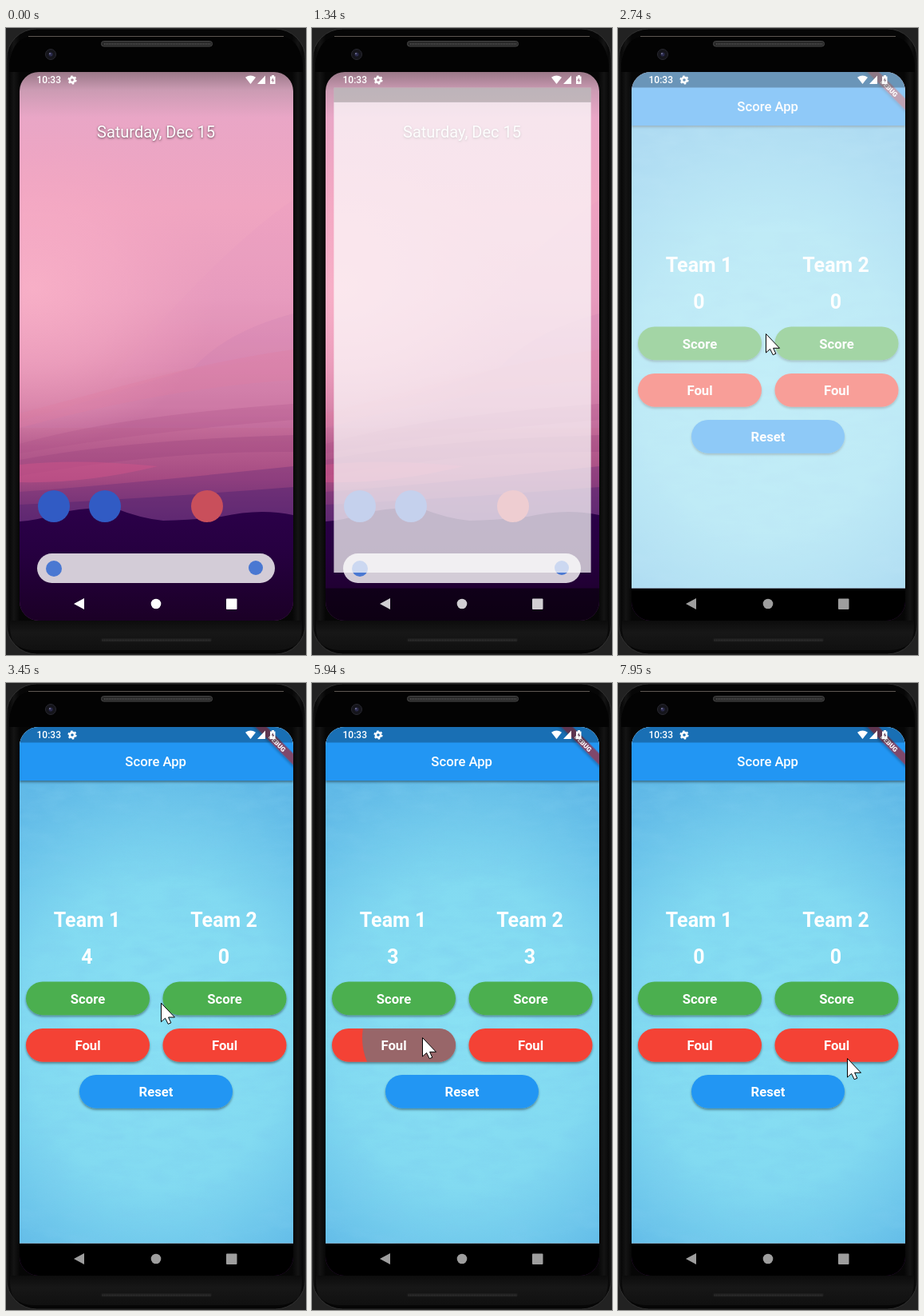
An HTML page that plays this animation: 376x784 px, repeating every 8 s.

```html
<!DOCTYPE html>
<html lang="en">
<head>
<meta charset="utf-8">
<title>Score App</title>
<style>
  html, body { margin: 0; width: 100%; height: 100%; overflow: hidden; background: #222; }
  svg { display: block; font-family: Roboto, sans-serif; }
  text { fill: #fff; }
  .mid { text-anchor: middle; }
  .big { font-size: 25px; font-weight: 700; }
  .label { font-size: 16.7px; font-weight: 700; }
</style>
</head>
<body>
<svg width="376" height="784" viewBox="0 0 376 784">
  <defs>
    <linearGradient id="body">
      <stop offset="0" stop-color="#1c1c1c"/><stop offset=".01" stop-color="#080808"/>
      <stop offset=".025" stop-color="#141414"/><stop offset=".045" stop-color="#060606"/>
      <stop offset=".955" stop-color="#060606"/><stop offset=".975" stop-color="#141414"/>
      <stop offset=".99" stop-color="#080808"/><stop offset="1" stop-color="#1c1c1c"/>
    </linearGradient>
    <linearGradient id="chin" x2="0" y2="1">
      <stop offset="0" stop-color="#0c0c0c"/><stop offset=".4" stop-color="#171717"/><stop offset="1" stop-color="#101010"/>
    </linearGradient>
    <linearGradient id="sky" gradientUnits="userSpaceOnUse" x1="0" y1="55" x2="0" y2="620">
      <stop offset="0" stop-color="#9a7888"/><stop offset=".04" stop-color="#cb9bb3"/>
      <stop offset=".1" stop-color="#e9a6c6"/><stop offset=".3" stop-color="#f0a5c1"/>
      <stop offset=".5" stop-color="#e89dbe"/><stop offset=".64" stop-color="#dd8bb0"/>
      <stop offset=".74" stop-color="#d07aa3"/><stop offset=".82" stop-color="#b96090"/>
      <stop offset=".9" stop-color="#a54a82"/><stop offset="1" stop-color="#662d70"/>
    </linearGradient>
    <linearGradient id="hill" x2="0" y2="1">
      <stop offset="0" stop-color="#2b0049"/><stop offset=".4" stop-color="#260040"/><stop offset="1" stop-color="#1b0026"/>
    </linearGradient>
    <radialGradient id="glow">
      <stop offset="0" stop-color="#fab2c8" stop-opacity=".85"/><stop offset=".5" stop-color="#f8adc6" stop-opacity=".5"/>
      <stop offset="1" stop-color="#f4a4c0" stop-opacity="0"/>
    </radialGradient>
    <radialGradient id="paper" gradientUnits="userSpaceOnUse" cx="0" cy="0" r="1" gradientTransform="translate(190 440) scale(300 345)">
      <stop offset="0" stop-color="#8ae1f4"/><stop offset=".55" stop-color="#82daf1"/><stop offset="1" stop-color="#60b9e7"/>
    </radialGradient>
    <filter id="grain" x="0" y="0" width="1" height="1">
      <feTurbulence type="fractalNoise" baseFrequency=".025 .07" numOctaves="5" seed="4"/>
      <feColorMatrix values="0 0 0 0 .2  0 0 0 0 .6  0 0 0 0 .86  1.3 0 0 0 -.48"/>
    </filter>
    <filter id="shadow" x="-.1" y="-.2" width="1.2" height="1.6">
      <feDropShadow dx="0" dy="2" stdDeviation="1.7" flood-opacity=".4"/>
    </filter>
    <clipPath id="screen"><rect x="17" y="55" width="343" height="686" rx="24"/></clipPath>
  </defs>

  <!-- phone -->
  <rect x=".5" y="1" width="375" height="782" rx="38" fill="url(#body)" stroke="#303030"/>
  <path d="M5 741H371V748Q371 778 340 778H36Q5 778 5 748Z" fill="url(#chin)"/>
  <path d="M4 46Q8 10.5 34 10.5H342Q368 10.5 372 46V55H4Z" fill="#030303"/>
  <path d="M28 10.5H348" stroke="#5d5752"/>
  <rect x="119.5" y="16.5" width="139" height="6.5" rx="3" fill="#292929" stroke="#444"/>
  <path d="M123 20H256" stroke="#4d4d4d" stroke-width="2" stroke-dasharray="1 1"/>
  <circle cx="56" cy="33" r="6.5" fill="#15151b" stroke="#282830"/>
  <circle cx="56" cy="33" r="2.5" fill="#2b2b4c"/><circle cx="55" cy="32" r="1" fill="#777796"/>
  <rect x="119" y="763" width="139" height="4.5" rx="2" fill="#1d1d1d"/>
  <path d="M121 765.5H257" stroke="#343434" stroke-width="2" stroke-dasharray="1 1"/>

  <g clip-path="url(#screen)">
    <g id="home">
      <rect x="17" y="55" width="343" height="686" fill="url(#sky)"/>
      <path d="M360 215Q270 275 130 440L360 410Z" fill="#d88fbd" opacity=".12"/>
      <path d="M17 492Q150 452 235 425Q275 380 360 357V500H17Z" fill="#c07ab0" opacity=".2"/>
      <ellipse cx="35" cy="325" rx="230" ry="200" fill="url(#glow)"/>
      <path d="M17 482Q150 446 222 428Q300 410 360 402V440Q200 450 17 500Z" fill="#de7a9f" opacity=".3"/>
      <path d="M17 520Q140 485 360 470V490Q170 505 17 532Z" fill="#a94c85" opacity=".25"/>
      <path d="M17 540Q150 515 360 509V530Q200 528 17 560Z" fill="#953f7b" opacity=".3"/>
      <path d="M17 546Q90 538 190 548Q100 570 17 568Z" fill="#cf5489" opacity=".5"/>
      <path d="M17 580Q150 570 360 548V620H17Z" fill="#6d2d78" opacity=".4"/>
      <path d="M17 596Q180 588 360 574V620H17Z" fill="#512370" opacity=".45"/>
      <path d="M17 617Q38 616 65 607Q100 598 138 601Q168 613 197 616Q238 615 270 611Q318 600 360 609V741H17Z" fill="url(#hill)"/>
      <text class="mid" x="188" y="137" font-size="20" style="text-shadow:0 1px 3px #0009">Saturday, Dec 15</text>
      <circle cx="60" cy="598" r="20" fill="#315bc4"/>
      <circle cx="124" cy="598" r="20" fill="#315bc4"/>
      <circle cx="252" cy="598" r="20" fill="#c94f5b"/>
      <rect x="39" y="657" width="298" height="37" rx="18.5" fill="#d3ccd7"/>
      <circle cx="60" cy="676" r="10" fill="#4a78d2"/>
      <circle cx="313" cy="675" r="9" fill="#4a78d2"/>
    </g>

    <rect id="navBar" x="17" y="700.5" width="343" height="40.5"/>
    <g id="window">
      <rect id="blank" x="17" y="55" width="343" height="645.5" fill="#fdfdfd"/>
      <g id="app">
        <rect x="17" y="55" width="343" height="645.5" fill="url(#paper)"/>
        <rect x="17" y="122" width="343" height="578.5" filter="url(#grain)" opacity=".55"/>
        <rect x="17" y="55" width="343" height="67" fill="#2196f3" filter="url(#shadow)"/>
        <text class="mid" x="187.7" y="104" font-size="16.7" font-weight="500">Score App</text>
        <g class="mid big">
          <text x="101.5" y="305">Team 1</text><text x="273" y="305">Team 2</text>
          <text id="score1" x="101.5" y="351"></text><text id="score2" x="273" y="351"></text>
        </g>
        <g id="buttons"></g>
        <g transform="translate(360 55) rotate(45)">
          <rect x="-40" y="23.4" width="80" height="10" fill="#b71c1c" opacity=".63" filter="url(#shadow)"/>
          <text class="mid" y="31.5" font-size="8.3" font-weight="900">DEBUG</text>
        </g>
      </g>
      <rect id="scrim" x="17" y="55" width="343" height="19.5"/>
    </g>

    <!-- system icons -->
    <g fill="#fff">
      <text x="38.5" y="69.2" font-size="12" font-weight="500">10:33</text>
      <circle cx="83" cy="65" r="3.1" fill="none" stroke="#fff" stroke-width="2.6"/>
      <circle cx="83" cy="65" r="4.8" fill="none" stroke="#fff" stroke-width="1.6" stroke-dasharray="2.5 2.526"/>
      <path d="M306.5 70L300 61.8Q306.5 57 313 61.8Z"/>
      <path d="M315 70H325V59.5Z"/>
      <path fill-rule="evenodd" d="M331 60.5H333V59H336V60.5H337.5V70H331ZM334.8 62L332.3 66H334V68.8L336.3 64.7H334.8Z"/>
      <g id="navIcons">
        <path d="M85 720L98 713V727Z"/><circle cx="188" cy="720" r="6.3"/>
        <rect x="276" y="713.5" width="13.5" height="13.5" rx="1"/>
      </g>
    </g>
  </g>
  <path id="cursor" d="M.5 .5V24L5.6 19.4L9.2 26.7L12.8 25.2L9.6 18.3H17.5Z" fill="#fff" stroke="#000" stroke-linejoin="round"/>
</svg>

<script>
const LOOP = 8000;
const $ = id => document.getElementById(id);
const clamp = v => Math.max(0, Math.min(1, v));
const set = (id, attrs) => Object.entries(attrs).forEach(([k, v]) => $(id).setAttribute(k, v));

// Bursts of activity: start, end, number of steps. The picture rests in between.
const BURSTS = [
  [0, 0, 1], [1180, 1580, 6], [2740, 2910, 3], [3140, 3140, 1], [3290, 3750, 7],
  [3920, 4710, 11], [4780, 5010, 4], [5170, 5480, 5], [5630, 6400, 11],
  [6470, 7090, 9], [7240, 7700, 7], [7870, 7950, 2]
];

// Pointer: time, x, y
const PATH = [
  [0, 185, 382], [3139, 185, 382], [3140, 153, 400], [3220, 153, 400], [3390, 180, 403],
  [3600, 235, 390], [3750, 260, 397], [5100, 260, 397], [5480, 138, 443],
  [6790, 138, 443], [7090, 168, 505], [7480, 168, 505], [7700, 286, 472],
  [7790, 286, 472], [7950, 287, 469]
];

const BUTTONS = [
  { name: 'score1', label: 'Score', x: 25, y: 373.5, w: 155, fill: '#4caf50' },
  { name: 'score2', label: 'Score', x: 196.5, y: 373.5, w: 155, fill: '#4caf50' },
  { name: 'foul1', label: 'Foul', x: 25, y: 432, w: 155, fill: '#f44336' },
  { name: 'foul2', label: 'Foul', x: 196.5, y: 432, w: 155, fill: '#f44336' },
  { name: 'reset', label: 'Reset', x: 92, y: 490, w: 192, fill: '#2196f3' }
];

// Press and release times; r is the splash radius reached at release.
const TAPS = [
  { on: 'score2', down: 3905, up: 3995, r: 9, x: 260, y: 397 },
  { on: 'score2', down: 4250, up: 4395, r: 18, x: 260, y: 397 },
  { on: 'score2', down: 4640, up: 4775, r: 14, x: 260, y: 397 },
  { on: 'foul1', down: 5620, up: 5860, r: 11, x: 139, y: 444 },
  { on: 'foul1', down: 6160, up: 6240, r: 9, x: 139, y: 444 },
  { on: 'foul1', down: 6540, up: 6615, r: 9, x: 139, y: 444 },
  { on: 'reset', down: 7230, up: 7310, r: 9, x: 168, y: 505 }
];
TAPS.forEach((tap, i) => tap.id = 'splash' + i);

$('buttons').innerHTML = BUTTONS.map(b => {
  const shape = `x="${b.x}" y="${b.y}" width="${b.w}" height="41.7" rx="20.8"`;
  const splashes = TAPS.filter(tap => tap.on === b.name)
    .map(tap => `<circle id="${tap.id}" cx="${tap.x}" cy="${tap.y}" fill="#607d8b"/>`).join('');
  return `<clipPath id="clip-${b.name}"><rect ${shape}/></clipPath>
    <rect ${shape} fill="${b.fill}" filter="url(#shadow)"/>
    <g clip-path="url(#clip-${b.name})">${splashes}</g>
    <text class="mid label" x="${b.x + b.w / 2}" y="${b.y + 27}">${b.label}</text>`;
}).join('');

function snap(t) {
  const [start, end, steps] = BURSTS.findLast(b => b[0] <= t);
  if (steps === 1) return start;
  const gap = (end - start) / (steps - 1);
  return start + gap * Math.min(steps - 1, Math.floor((t - start) / gap + 0.02));
}

function pointerAt(t) {
  const i = PATH.findLastIndex(p => p[0] <= t);
  const a = PATH[i], b = PATH[i + 1] || a;
  const k = clamp((t - a[0]) / (b[0] - a[0] || 1));
  return [a[1] + (b[1] - a[1]) * k, a[2] + (b[2] - a[2]) * k];
}

function drawSplash(tap, t) {
  const held = t < tap.up;
  const radius = held ? tap.r * clamp((t - tap.down) / (tap.up - tap.down)) : tap.r + 0.834 * (t - tap.up);
  const opacity = t < tap.down ? 0 : held ? 1 : clamp(1 - (t - tap.up) / 200);
  set(tap.id, { r: radius, opacity });
}

function draw(t) {
  // launch
  const open = clamp((t - 1180) / 320);
  const scale = 0.758 + 0.242 * (1 - (1 - open) ** 2);
  set('window', {
    visibility: t < 1180 ? 'hidden' : 'visible',
    transform: `translate(188.5 378) scale(${scale}) translate(-188.5 -378)`
  });
  set('blank', { opacity: clamp(0.13 + 1.2 * open) });
  set('scrim', { opacity: 0.15 + 0.11 * open });
  set('navBar', { opacity: open });
  set('navIcons', { opacity: 1 - 0.38 * open });
  set('app', { opacity: t < 2740 ? 0 : clamp(0.5 + (t - 2740) / 300) });

  // game
  const taps = name => TAPS.filter(tap => tap.on === name && tap.up <= t).length;
  const playing = t >= 3140 && !taps('reset');
  $('score1').textContent = playing ? 4 - taps('foul1') : 0;
  $('score2').textContent = playing ? taps('score2') : 0;
  TAPS.forEach(tap => drawSplash(tap, t));

  const [x, y] = pointerAt(t);
  set('cursor', { transform: `translate(${x} ${y})`, visibility: t < 1579 ? 'hidden' : 'visible' });
}

function frame() {
  draw(snap(performance.now() % LOOP));
  requestAnimationFrame(frame);
}
frame();
</script>
</body>
</html>
```
